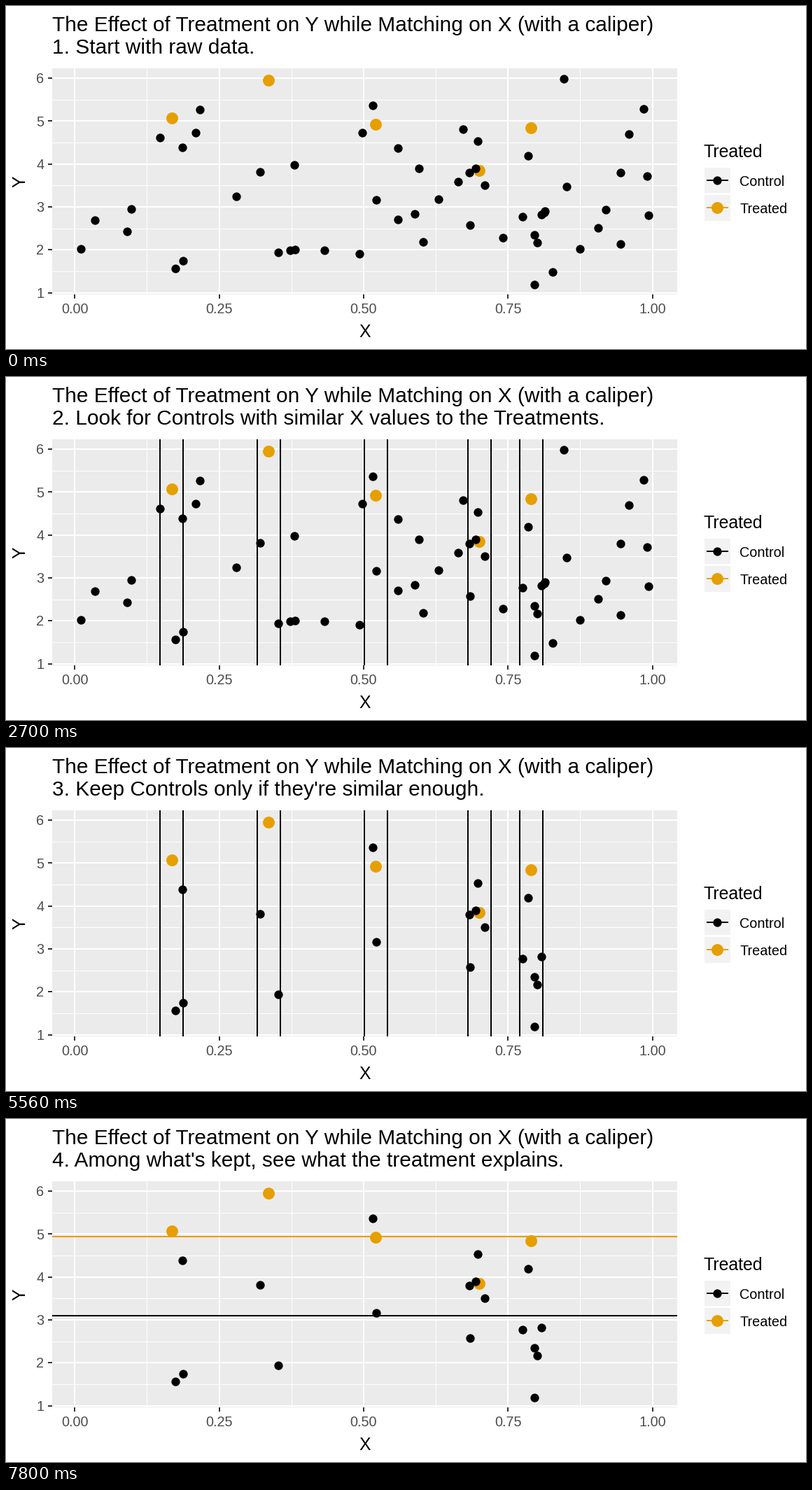
Recreate the animation shown at these times as a matplotlib script. Size 1143 by 490 pixels, loop 8000 ms.

```python
import numpy as np
import matplotlib.pyplot as plt
from matplotlib.animation import FuncAnimation
from matplotlib.patches import Rectangle

W, H, DPI = 1143, 490, 100
INTERVAL, FRAMES = 100, 80
PT = 72 / DPI  # points per pixel

LEFT, RIGHT, TOP, BOTTOM = 66, 959, 89, 412
ORANGE, BLACK = "#E69F00", "black"
CALIPER = 16.5
CONTROL_D, TREATED_D = 12.3, 16.9

TITLE = "The Effect of Treatment on Y while Matching on X (with a caliper)"
STEPS = [
    (0, "1. Start with raw data."),
    (500, "2. Look for Controls with similar X values to the Treatments."),
    (3700, "3. Keep Controls only if they're similar enough."),
    (6800, "4. Among what's kept, see what the treatment explains."),
]
BANDS_ON, FILTER_ON, BANDS_OFF, MEANS_ON = 1200, 3700, 6800, 7800

# Point centres in stage pixels
treated = np.array([(236.9, 160), (375.2, 106), (528, 169.3),
                    (676, 235.4), (750, 174)])
control = np.array([
    (106.8, 347), (126.5, 305.5), (172.7, 321.5), (179.4, 290), (220.1, 188.5),
    (251.8, 201.7), (270.7, 181.5), (277.3, 148.3), (242.4, 375), (252.8, 364),
    (329, 271.7), (363.2, 237), (412.2, 227.3), (389.4, 352), (405.7, 349),
    (412.7, 347.7), (455.3, 349), (504.8, 354), (508.6, 181), (523.8, 142.2),
    (559.7, 202.7), (529.3, 277.4), (560.2, 304.5), (583.8, 296.8),
    (589.6, 231.6), (595.6, 336.8), (618.4, 275.7), (645.6, 251.3),
    (653.4, 175.6), (674, 193), (662, 238), (670.7, 231.7), (684.3, 256.2),
    (662.6, 312.8), (710, 330.7), (746.4, 213.8), (737.8, 300.7), (765, 298),
    (754.6, 327), (758.9, 338.4), (755, 397.6), (781.3, 379.7), (769, 295),
    (770.4, 293.4), (797, 103.6), (801.4, 258.3), (820.4, 347), (846, 317),
    (857.4, 290.5), (877.6, 238.2), (878.2, 339.5), (890.2, 182.8),
    (910.8, 147.4), (915.7, 243.2), (918.4, 299.2),
])
gaps = np.abs(control[:, :1] - treated[:, 0])
kept = control[(gaps <= CALIPER).any(axis=1)]

fig = plt.figure(figsize=(W / DPI, H / DPI), dpi=DPI, facecolor="white")
ax = fig.add_axes([0, 0, 1, 1])
ax.set_xlim(0, W)
ax.set_ylim(H, 0)
ax.axis("off")


def px(x):
    return 98.2 + 825.3 * x


def py(y):
    return 470.8 - 61.3 * y


def line(x0, y0, x1, y1, color, width=2, z=2):
    return ax.plot([x0, x1], [y0, y1], color=color, lw=width * PT, zorder=z,
                   solid_capstyle="butt")[0]


def label(x, y, s, size, color=BLACK, **kw):
    return ax.text(x, y, s, fontsize=size * PT, color=color,
                   family="Liberation Sans", **kw)


def dots(points, diameter, color, z):
    points = np.asarray(points)
    return ax.scatter(points[:, 0], points[:, 1], s=(diameter * PT) ** 2,
                      c=color, linewidths=0, zorder=z)


def box(x, y, w, h, color):
    ax.add_patch(Rectangle((x, y), w, h, fc=color, lw=0, zorder=1))


# Panel, grid and axes
box(LEFT, TOP, RIGHT - LEFT, BOTTOM - TOP, "#EBEBEB")
for x in np.arange(0.125, 1, 0.25):
    line(px(x), TOP, px(x), BOTTOM, "white", 1)
for y in np.arange(1.5, 6):
    line(LEFT, py(y), RIGHT, py(y), "white", 1)
for x in np.arange(0, 1.01, 0.25):
    line(px(x), TOP, px(x), BOTTOM, "white")
    line(px(x), BOTTOM, px(x), BOTTOM + 6, "#333333")
    label(px(x), 439.3, f"{x:.2f}", 19.9, "#4D4D4D", ha="center")
for y in range(1, 7):
    line(LEFT, py(y), RIGHT, py(y), "white")
    line(LEFT - 6, py(y), LEFT, py(y), "#333333")
    label(54.5, py(y) + 7.2, str(y), 19.9, "#4D4D4D", ha="right")
label(512.3, 473, "X", 24.9, ha="center")
label(32.3, 250.5, "Y", 24.9, rotation=90, ha="right", va="center")

# Legend
label(996.8, 215.5, "Treated", 24.9)
for y, name, color, size in [(249, "Control", BLACK, CONTROL_D),
                             (288.2, "Treated", ORANGE, TREATED_D)]:
    box(998, y - 18.2, 36.8, 36.6, "#F2F2F2")
    line(1001, y, 1032, y, color)
    dots([(1016.3, y)], size, color, 5)
    label(1048.2, y + 7.7, name, 19.9)

# Headings
label(66, 36.2, TITLE, 29.85)
subtitle = label(66, 68.3, "", 29.85)

# Data layers
dots(treated, TREATED_D, ORANGE, 5)
all_dots = dots(control, CONTROL_D, BLACK, 6)
kept_dots = dots(kept, CONTROL_D, BLACK, 6)
bands = [line(x + side, TOP, x + side, BOTTOM, BLACK, z=4)
         for x in treated[:, 0] for side in (-CALIPER, CALIPER)]
means = [line(LEFT, y, RIGHT, y, color, z=4)
         for y, color in [(168.4, ORANGE), (281, BLACK)]]


def update(i):
    t = i * INTERVAL
    subtitle.set_text([text for start, text in STEPS if t >= start][-1])
    all_dots.set_visible(t < FILTER_ON)
    kept_dots.set_visible(t >= FILTER_ON)
    for band in bands:
        band.set_visible(BANDS_ON <= t < BANDS_OFF)
    for mean in means:
        mean.set_visible(t >= MEANS_ON)
    return [subtitle, all_dots, kept_dots, *bands, *means]


anim = FuncAnimation(fig, update, frames=FRAMES, interval=INTERVAL,
                     repeat=True, repeat_delay=0, blit=False)
plt.show()
```
